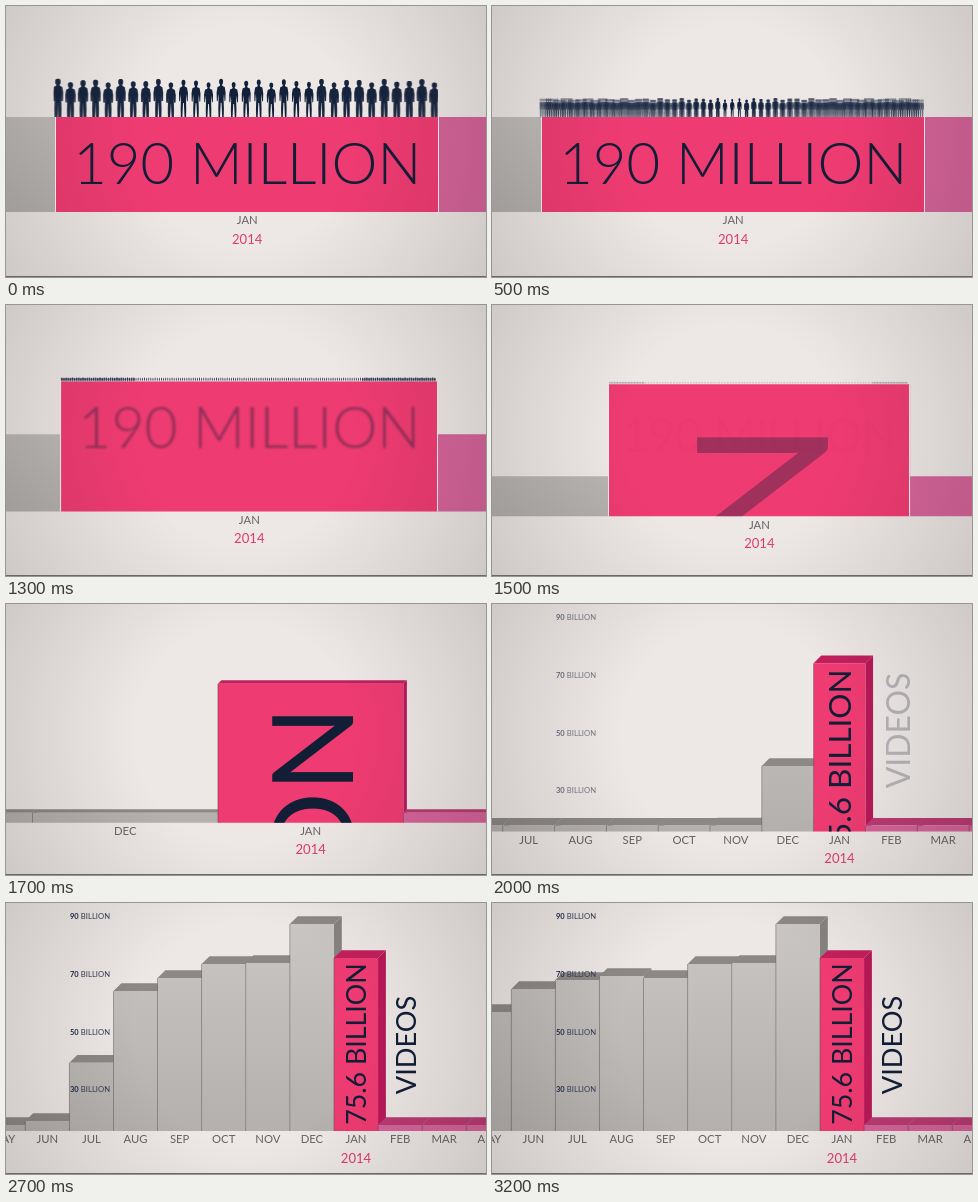
Recreate the animation shown at these times as an HTML page with a canvas. Size 480x271 px, loop 3.3 s.

```html
<!DOCTYPE html>
<html lang="en">
<head>
<meta charset="utf-8">
<title>Bar chart zoom</title>
<style>
html, body { margin: 0; width: 100%; height: 100%; overflow: hidden; background: #ede8e6; }
canvas { display: block; width: 100vw; height: 100vh; }
</style>
</head>
<body>
<canvas id="stage" width="480" height="271"></canvas>
<script>
const ctx = document.getElementById('stage').getContext('2d');
const LOOP = 3300, STEP = 100, UNIT = 44.1, WIDE = 383;
const NAVY = '#111e36', FONT = 'Lato, "Open Sans", sans-serif';
const MONTHS = 'MAY JUN JUL AUG SEP OCT NOV DEC JAN FEB MAR APR'.split(' ');
const JAN = MONTHS.indexOf('JAN');
const HEIGHTS = [119, 142, 151, 155, 153, 167, 168, 207];

const mix = (a, b, u) => a + (b - a) * u;

// Smooth 0 to 1 progress, beginning at start and lasting span ms
function ease(t, start, span) {
  const u = Math.max(0, Math.min(1, (t - start) / span));
  return u * u * (3 - 2 * u);
}

function poly(fill, ...p) {
  ctx.fillStyle = fill;
  ctx.beginPath();
  for (let i = 0; i < p.length; i += 2) ctx.lineTo(p[i], p[i + 1]);
  ctx.fill();
}

function text(str, x, y, size, color, align = 'center', weight = 400) {
  ctx.font = `${weight} ${size}px ${FONT}`;
  ctx.textAlign = align;
  ctx.fillStyle = color;
  ctx.fillText(str, x, y);
}

function upright(str, x, y, size, align) {
  ctx.save();
  ctx.translate(x, y);
  ctx.rotate(-Math.PI / 2);
  text(str, 0, 0, size, NAVY, align);
  ctx.restore();
}

function shade(y0, y1, from, to) {
  const g = ctx.createLinearGradient(0, y0, 0, y1);
  g.addColorStop(0, from);
  g.addColorStop(1, to);
  return g;
}

// One standing figure, 38 units tall with its feet at the origin
const figure = new Path2D('M-1-32H1L1.3-30.5L3.6-29.4L4.5-24L4.3-16L3.4-15.5L2.9-23L2.5-18' +
  'L2.8-8L2.6 0H1.1L.4-14H-.4L-1.1 0H-2.6L-2.8-8L-2.5-18L-2.9-23L-3.4-15.5L-4.3-16L-4.5-24L-3.6-29.4L-1.3-30.5Z');
figure.ellipse(0, -34.5, 2, 2.9, 0, 0, 7);

function crowd(t, cx, ground, half) {
  const alpha = 1 - ease(t, 1300, 300), sec = t / 1000;
  if (!alpha) return;
  const s = Math.exp(-2 * sec * sec / (sec + .22));
  const gap = 12.55 * s ** .8;
  const blur = .012 + .05 * ease(t, 0, 400) - .055 * ease(t, 1000, 300);
  const count = Math.floor(half / gap);
  ctx.save();
  ctx.beginPath();
  ctx.rect(cx - half - 2, 0, 2 * half + 3, ground);
  ctx.clip();
  ctx.fillStyle = '#12203a';
  for (let k = -count; k <= count; k++) {
    const tall = .97 + .05 * Math.sin(k * 2.4);
    const copies = Math.abs(k * gap * blur) < .8 ? 1 : 7;
    ctx.globalAlpha = alpha * (copies > 1 ? .42 : 1);
    for (let j = 0; j < copies; j++) {
      const zoom = copies > 1 ? 1 + blur * (j / (copies - 1) - .5) : 1;
      ctx.save();
      ctx.translate(cx + k * gap * zoom, ground);
      ctx.scale(s, s * tall);
      ctx.fill(figure);
      ctx.restore();
    }
  }
  ctx.restore();
}

function bar(x, w, base, h, depth, front, top, side) {
  const y = base - h, r = x + w;
  if (depth) {
    poly(side, r, y, r + depth, y - depth, r + depth, base - depth, r, base);
    poly(top, x, y, x + depth, y - depth, r + depth, y - depth, r, y);
  }
  poly(front, x, y, r, y, r, base, x, base);
  if (depth) {
    ctx.fillStyle = 'rgba(70,66,66,.5)';
    ctx.fillRect(x - .4, y, .8, h);
  }
}

function chart(t, left, w, base, janH, depth) {
  const low = mix(95, 6, ease(t, 1104, 684));
  const gray = shade(20, base, '#c9c6c4', '#b3b0ae');
  MONTHS.forEach((name, i) => {
    const x = left + (i - JAN) * w;
    if (i < JAN) {
      const rise = ease(t, 1863 + 133 * (JAN - 1 - i), 380);
      bar(x, w, base, mix(low, HEIGHTS[i], rise), depth, gray, '#8b8886', '#858280');
    } else if (i === JAN) {
      bar(x, w, base, janH, depth, '#ee3b71', '#c21f5c', '#b81857');
    } else {
      bar(x, w, base, low, depth, '#d6649a', '#ba3a73', '#a82e64');
    }
    text(name, x + w / 2, base + 12.3, 11.3, '#666263');
  });
}

function draw(t) {
  const zoom = ease(t, 1230, 846);
  const w = mix(WIDE, UNIT, zoom), scale = w / UNIT;
  const cx = mix(241.2, 350, zoom), base = mix(206, 228, zoom);
  const janH = 95 + 37 * ease(t, 1000, 350) + 41 * ease(t, 1550, 570);
  const left = cx - w / 2, top = base - janH;
  const depth = Math.max(0, 9.2 * (1 - w / 300));

  ctx.globalAlpha = 1;
  ctx.fillStyle = '#ede8e6';
  ctx.fillRect(0, 0, 480, 271);

  chart(t, left, w, base, janH, depth);
  if (!depth) {
    ctx.fillStyle = '#fbeff2';
    for (const x of [left, left + w]) ctx.fillRect(Math.round(x) - 1, top, 1, janH);
  }
  text('2014', cx, base + 31.5, 13.1, '#de3a72');
  crowd(t, cx - 1, top, w / 2 - 1);

  ctx.globalAlpha = 1 - ease(t, 1000, 550);
  const blur = ease(t, 1000, 300);
  ctx.filter = blur ? `blur(${blur}px)` : 'none';
  text('190 MILLION', cx, top + 67, 58 * w / WIDE, NAVY, 'center', 300);
  ctx.filter = 'none';

  ctx.save();
  ctx.beginPath();
  ctx.rect(left, top, w, janH);
  ctx.clip();
  ctx.globalAlpha = ease(t, 1400, 250);
  upright('75.6 BILLION', cx + 10 * scale, top + 5.3 * scale, 26.8 * scale, 'right');
  ctx.restore();

  ctx.globalAlpha = ease(t, 1900, 300);
  upright('VIDEOS', cx + 60.3 * scale, base - 86 * scale, 27.2 * scale, 'center');

  ctx.globalAlpha = ease(t, 1850, 250);
  for (let i = 0; i < 4; i++) {
    const y = 16.2 + i * 57.7;
    text(90 - 20 * i, 64, y, 7.5, '#202c48', 'left', 700);
    text('BILLION', 104, y, 7.7, '#333b52', 'right');
  }

  ctx.globalAlpha = 1;
  const vignette = ctx.createRadialGradient(240, 130, 110, 240, 130, 300);
  vignette.addColorStop(0, 'rgba(30,20,20,0)');
  vignette.addColorStop(1, 'rgba(30,20,20,.17)');
  ctx.fillStyle = vignette;
  ctx.fillRect(0, 0, 480, 271);
  ctx.fillStyle = '#6b6867';
  ctx.fillRect(0, 270, 480, 1);
}

const start = performance.now();
function frame() {
  const t = Math.max(0, performance.now() - start) % LOOP;
  draw(Math.floor(t / STEP) * STEP);
  requestAnimationFrame(frame);
}
frame();
</script>
</body>
</html>
```
